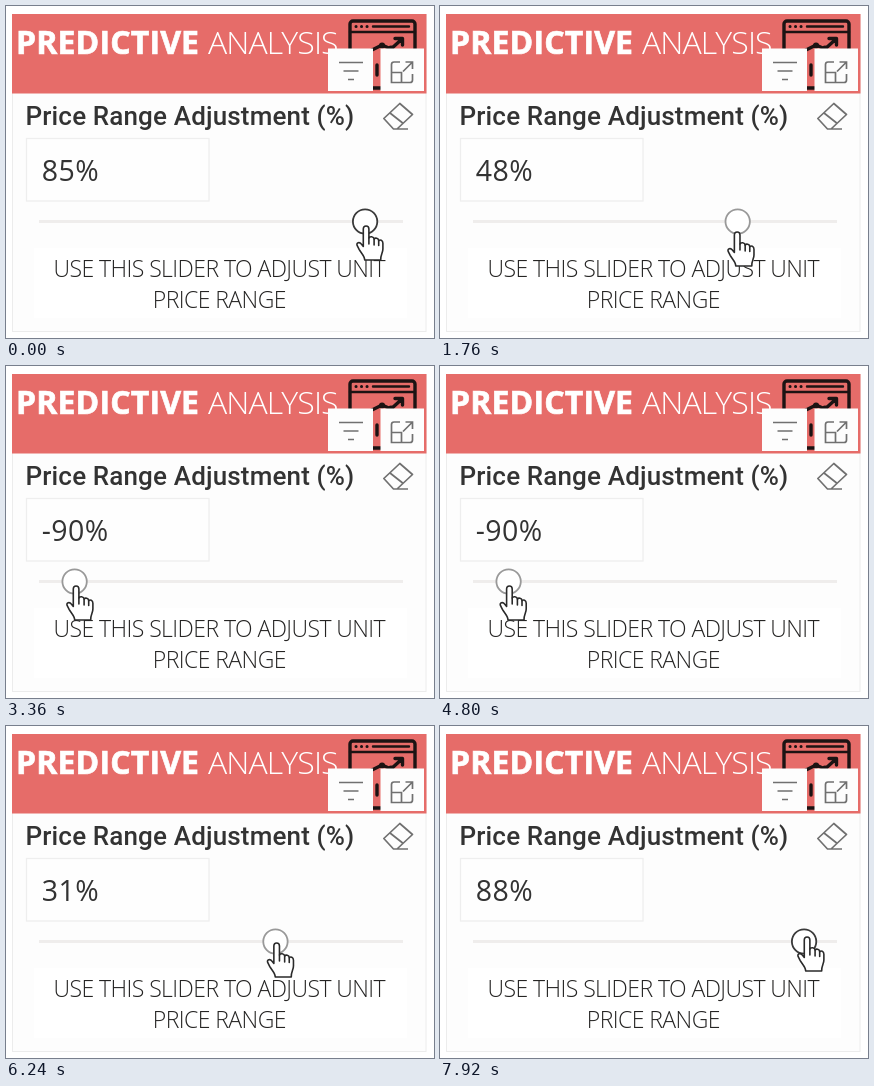
Recreate the animation shown at these times as an HTML page. Size 428 by 332 pixels, loop 8000 ms.

```html
<!DOCTYPE html>
<html lang="en">
<head>
<meta charset="utf-8">
<title>Price range slider</title>
<style>
  html, body { margin: 0; width: 100%; height: 100%; overflow: hidden; background: #fff; }
  svg { display: block; width: 100vw; height: 100vh; }
  text { font-family: "Open Sans", "Noto Sans", sans-serif; }
  .title { font-size: 32px; fill: #fff; }
  .bold { font-weight: 700; letter-spacing: 0.15px; stroke: #fff; stroke-width: 0.7; }
  .light { font-weight: 300; letter-spacing: -0.9px; }
  .label { font: 500 26px Roboto, sans-serif; letter-spacing: 0.15px; fill: #333; }
  .value { font-size: 28.5px; letter-spacing: 0.4px; fill: #333; }
  .note { font-size: 23px; font-weight: 300; letter-spacing: -0.56px; fill: #252423; text-anchor: middle; }
  .line { fill: none; stroke: #707070; stroke-width: 1.7; }
  .ink { fill: none; stroke: #1c1313; stroke-width: 3.4; stroke-linejoin: round; stroke-linecap: round; }
  .cursor { fill: #fff; stroke: #2a2a2a; stroke-width: 1.6; stroke-linejoin: round; stroke-linecap: round; }
</style>
</head>
<body>
<svg viewBox="0 0 428 332" preserveAspectRatio="none">
  <rect x="6.5" y="8.5" width="413.5" height="317" fill="#fdfdfd" stroke="#ececec"/>
  <rect x="6" y="8" width="414.5" height="79.5" fill="#e66c69"/>

  <text class="title bold" x="10" y="48">PREDICTIVE</text>
  <text class="title light" x="202" y="48">ANALYSIS</text>

  <!-- browser window icon -->
  <g class="ink">
    <rect x="344" y="15" width="65" height="67" rx="3"/>
    <path stroke-width="2.4" d="M344 26H409M367 20.5H403"/>
    <path d="M362 46L376 39L385 43L396 33M389 32.5H396.5V39"/>
    <path d="M371 59V69"/>
    <path stroke-width="3" d="M350 20.5h.1M355.5 20.5h.1M361 20.5h.1"/>
    <path stroke-width="6" d="M376 39.5h.1M385 42.5h.1"/>
  </g>

  <rect x="322" y="42.5" width="45" height="42.5" fill="#fdfdfd"/>
  <rect x="374.5" y="42.5" width="43.5" height="42.5" fill="#fdfdfd"/>
  <path class="line" d="M333 56.5H357M337.5 65H352.5M342 73.5H348"/>
  <path class="line" d="M385.5 66.5V58.5Q385.5 56 388 56H394M385.5 66.5H395.5V76.5H385.5ZM395.5 76.5H404Q406.5 76.5 406.5 74V68M397 65.5L406.5 56M399.5 56H406.5V63"/>

  <text class="label" x="19.5" y="119">Price Range Adjustment (%)</text>
  <path class="line" stroke-linejoin="round" d="M377.8 112.5L393.8 97.5L406.5 108.5L391 123H387.5ZM384 107L397.3 117.5M390 123H402"/>

  <rect x="20.5" y="132.5" width="182.5" height="62.5" fill="#fefefe" stroke="#eee" stroke-width="1.3"/>
  <text class="value" id="value" x="35.8" y="175"></text>

  <rect x="28" y="242" width="373" height="70" fill="#fff"/>
  <path d="M33 215.5H397" stroke="#efedec" stroke-width="3"/>
  <circle id="thumb" cy="215.5" r="12.2" fill="#fff" stroke-width="1.8"/>
  <text class="note" x="213.3" y="271">USE THIS SLIDER TO ADJUST UNIT</text>
  <text class="note" x="213.3" y="302">PRICE RANGE</text>

  <g id="hand" class="cursor">
    <path d="M-2.8 3C-2.8 -1 2.8 -1 2.8 3V12C3.6 10 7.6 10.3 8 13C9 11.4 12.4 12 12.6 14.6C13.8 13.4 16.8 14.2 16.8 17.2V23C16.8 27 14.6 28 14.6 34H-1.4C-1.4 30 -5 27 -7 23.4L-9 19.4C-10 16.6 -6.6 15.6 -4.8 18L-2.8 20.4Z"/>
    <path fill="none" d="M2.8 12V18M8 13V19M12.6 15V19.5"/>
  </g>
  <path id="arrow" class="cursor" stroke-width="1.4" d="M0 0V22.5L5 17.8L8.8 26.6L12.5 25L8.8 16.3H15.7Z"/>
</svg>
<script>
const LOOP = 8000;
// time, slider value, pointer offset from the thumb, pointer height
const keys = [
  [0, 85, 1, 220], [1120, 85, 1, 220], [2400, -15, -2, 232], [3280, -90, 1.5, 220],
  [4880, -90, 0.8, 220], [6240, 31, 1.2, 217], [6960, 88, 3, 212], [LOOP, 88, 3, 211]
];
const el = id => document.getElementById(id);
const [value, thumb, hand, arrow] = ["value", "thumb", "hand", "arrow"].map(el);

const slope = (i, c) => (keys[i + 1][c] - keys[i][c]) / (keys[i + 1][0] - keys[i][0]);

// Tangent that is flat at every stop and never overshoots
function tangent(i, c) {
  if (i === 0 || i === keys.length - 1) return 0;
  const a = slope(i - 1, c), b = slope(i, c);
  return a * b > 0 ? 2 * a * b / (a + b) : 0;
}

function at(t, c) {
  let i = 0;
  while (i < keys.length - 2 && t >= keys[i + 1][0]) i++;
  const [a, b] = [keys[i], keys[i + 1]];
  const span = b[0] - a[0], u = (t - a[0]) / span;
  const s = u * u * (3 - 2 * u);
  return a[c] + (b[c] - a[c]) * s
    + span * u * (1 - u) * ((1 - u) * tangent(i, c) - u * tangent(i + 1, c));
}

function draw(t) {
  const percent = Math.round(at(t, 1));
  const x = 218 + 1.66 * percent;
  const y = at(t, 3);
  const below = y > 228;
  const place = `translate(${x + at(t, 2)} ${y})`;
  value.textContent = percent + "%";
  thumb.setAttribute("cx", x);
  thumb.setAttribute("stroke", t < 1120 || t > 6960 ? "#3a3a3a" : "#999");
  hand.setAttribute("transform", place);
  arrow.setAttribute("transform", place);
  hand.style.display = below ? "none" : "";
  arrow.style.display = below ? "" : "none";
}

const start = performance.now();
function tick() {
  draw((performance.now() - start) % LOOP);
  requestAnimationFrame(tick);
}
tick();
</script>
</body>
</html>
```
